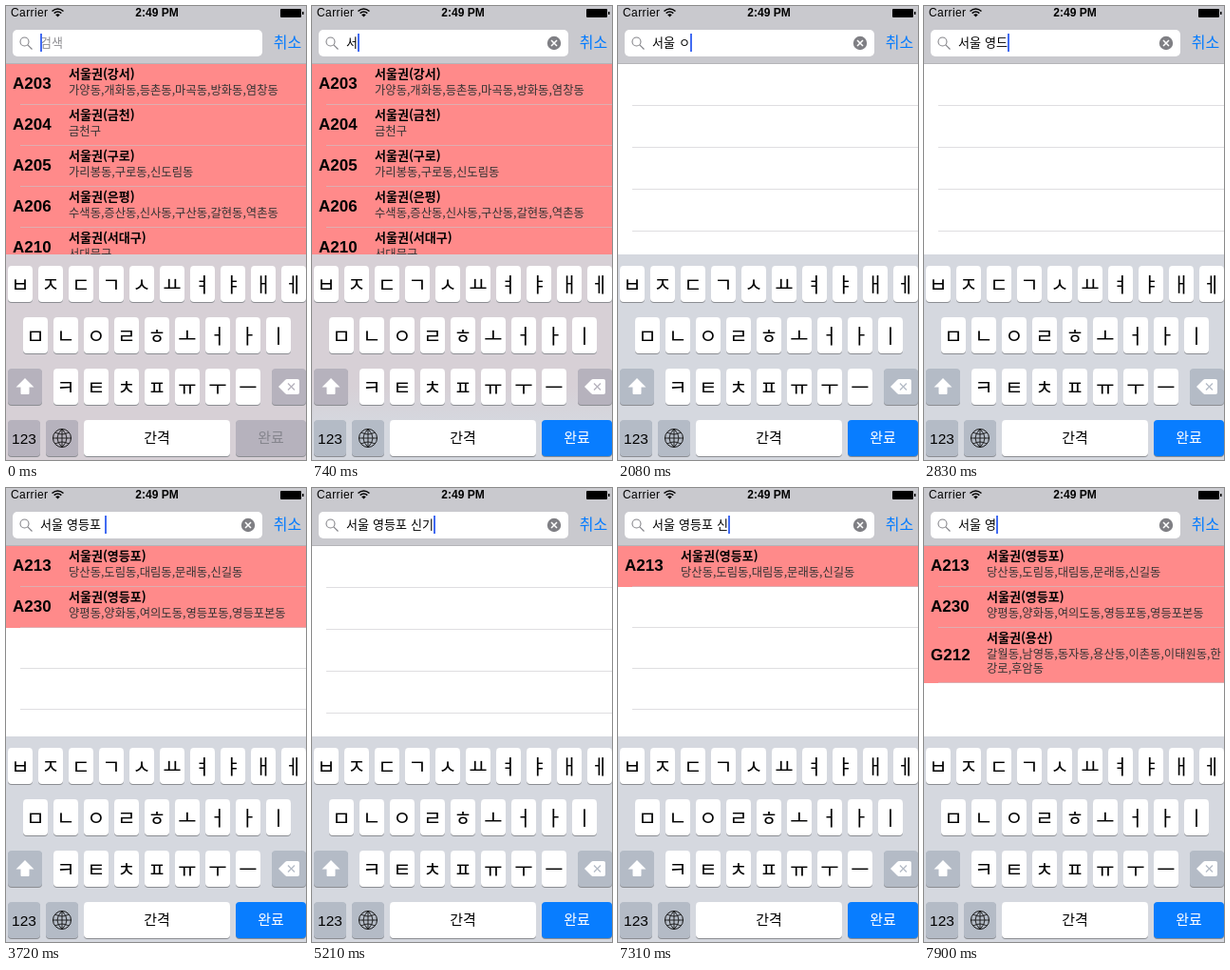
Write an HTML page with a canvas that moves like this. It is 316 px wide and 477 px high and loops after 8 s.

```html
<!DOCTYPE html>
<html lang="ko">
<head>
<meta charset="utf-8">
<style>
  html, body { margin: 0; width: 316px; height: 477px; overflow: hidden; }
  canvas { display: block; width: 316px; height: 477px; }
</style>
</head>
<body>
<canvas id="stage"></canvas>
<script>
const W = 316, H = 477, LOOP = 8000;
const KOREAN = '"Noto Sans CJK KR", "Noto Sans CJK", sans-serif';
const LATIN = '"Liberation Sans", sans-serif';
const canvas = document.getElementById('stage');
const ctx = canvas.getContext('2d');
const ratio = window.devicePixelRatio || 1;
canvas.width = W * ratio;
canvas.height = H * ratio;

const AREAS = [
  ['A203', '서울권(강서)', '가양동,개화동,등촌동,마곡동,방화동,염창동'],
  ['A204', '서울권(금천)', '금천구'],
  ['A205', '서울권(구로)', '가리봉동,구로동,신도림동'],
  ['A206', '서울권(은평)', '수색동,증산동,신사동,구산동,갈현동,역촌동'],
  ['A210', '서울권(서대구)', '서대문구'],
  ['A213', '서울권(영등포)', '당산동,도림동,대림동,문래동,신길동'],
  ['A230', '서울권(영등포)', '양평동,양화동,여의도동,영등포동,영등포본동'],
  ['G212', '서울권(용산)', '갈월동,남영동,동자동,용산동,이촌동,이태원동,한', '강로,후암동'],
];

// start time, typed text, caret opacity, query used for the list
const STEPS = [
  [0, ''], [450, 'ㅅ'], [600, '서'], [890, '성', 1, '서'],
  [1490, '서우'], [1640, '서울'], [1780, '서울 '],
  [2080, '서울 ㅇ'], [2230, '서울 여'], [2380, '서울 영'],
  [2830, '서울 영드'], [2980, '서울 영등'],
  [3420, '서울 영등ㅍ'], [3570, '서울 영등포'], [3720, '서울 영등포 '],
  [4470, '서울 영등포 ㅅ'], [4620, '서울 영등포 시'], [4770, '서울 영등포 신'], [4920, '서울 영등포 신ㄱ'],
  [5210, '서울 영등포 신기'], [5360, '서울 영등포 신길'],
  [5960, '서울 영등포 신길', .4], [6110, '서울 영등포 신길', 0],
  [6410, '서울 영등포 신길', .4], [6560, '서울 영등포 신길'],
  [6710, '서울 영등포 신기'], [7160, '서울 영등포 신ㄱ'], [7310, '서울 영등포 신'],
  [7460, '서울 영등포 '], [7600, '서울 영등포'], [7750, '서울 영등'], [7900, '서울 영'],
];

function rect(x, y, w, h, color, radius = 0) {
  ctx.fillStyle = color;
  ctx.beginPath();
  ctx.roundRect(x, y, w, h, radius);
  ctx.fill();
}

function text(str, x, y, font, color = '#000', align = 'left') {
  ctx.font = font;
  ctx.fillStyle = color;
  ctx.textAlign = align;
  ctx.fillText(str, x, y);
}

function path(d, color, lineWidth) {
  const shape = new Path2D(d);
  if (lineWidth) {
    ctx.strokeStyle = color;
    ctx.lineWidth = lineWidth;
    ctx.stroke(shape);
  } else {
    ctx.fillStyle = color;
    ctx.fill(shape);
  }
}

function circle(x, y, r, color, lineWidth) {
  path(`M${x - r} ${y}a${r} ${r} 0 1 1 ${2 * r} 0a${r} ${r} 0 1 1 ${-2 * r} 0z`, color, lineWidth);
}

function drawHeader(typed, caret) {
  rect(0, 0, W, 60, '#c9c9ce');
  rect(0, 60, W, 1, '#b4b4b8');
  ctx.letterSpacing = '0.4px';
  text('Carrier', 5, 11, '12px ' + LATIN);
  ctx.letterSpacing = '0px';
  path('M48.5 5.5Q54.5 0.5 60.5 5.5M50.7 7.6Q54.5 4.4 58.3 7.6', '#000', 1.6);
  path('M52.2 9.2Q54.5 7.4 56.8 9.2L54.5 11.6z', '#000');
  text('2:49 PM', 159, 11, 'bold 12px ' + LATIN, '#000', 'center');
  rect(289, 3, 22, 9, '#000', 1);
  rect(312, 6, 1.5, 3, '#000');

  rect(7, 25, 263, 28, '#fff', 5);
  circle(19.5, 37.5, 4.5, '#85858a', 1.1);
  path('M22.8 40.8L27.5 45.5', '#85858a', 1.2);
  ctx.wordSpacing = '1.1px';
  text(typed || '검색', 36, 43, '13.04px ' + KOREAN, typed ? '#000' : '#8e8e93');
  const caretX = Math.round(36 + ctx.measureText(typed).width);
  ctx.wordSpacing = '0px';
  ctx.globalAlpha = caret;
  rect(caretX, 29, 2, 19, '#426bf2');
  ctx.globalAlpha = 1;
  if (typed) {
    circle(255, 39, 7.2, '#7f7f84');
    path('M252 36l6 6M258 36l-6 6', '#fff', 1.5);
  }
  text('취소', 296.5, 43.5, '16px ' + KOREAN, '#007aff', 'center');
}

function drawList(rows) {
  rect(0, 61, W, 200, '#fff');
  ctx.save();
  ctx.beginPath();
  ctx.rect(0, 61, W, 200);
  ctx.clip();
  let y = 61, height = 44;
  for (let i = 0; y < 261; i++, y += height) {
    const row = rows[i];
    if (row) {
      const [code, title, ...lines] = row;
      height = 28 + 15 * lines.length;
      rect(0, y, W, height, '#ff8a8a');
      text(code, 7, y + height / 2 + 4.5, 'bold 17px ' + LATIN);
      text(title, 66, y + 15, 'bold 13px ' + KOREAN);
      lines.forEach((line, n) => text(line, 66, y + 32 + 15 * n, '300 12.3px ' + KOREAN, '#333'));
    }
    rect(15, y + height - 1, W - 15, 1, 'rgba(200,199,204,.58)');
  }
  ctx.restore();
}

function key(x, y, w, color = '#fff', label = '', font = '300 21px ' + KOREAN, drop = 8, ink = '#000') {
  rect(x, y + 1, w, 38, '#8b8d92', 4);
  rect(x, y, w, 38, color, 4);
  text(label, x + w / 2, y + 19 + drop, font, ink, 'center');
}

function drawKeyboard(active, tinted) {
  rect(0, 261, W, 216, '#d5d8df');
  if (tinted) {
    const tint = ctx.createLinearGradient(0, 400, 0, 440);
    tint.addColorStop(0, '#d7d0d6');
    tint.addColorStop(1, active ? '#d5d8df' : '#d7d0d6');
    rect(0, 261, W, 216, tint);
  }
  const gray = tinted ? '#b6b2bd' : '#b4bbc6';
  ['ㅂㅈㄷㄱㅅㅛㅕㅑㅐㅔ', 'ㅁㄴㅇㄹㅎㅗㅓㅏㅣ', 'ㅋㅌㅊㅍㅠㅜㅡ'].forEach((row, r) =>
    [...row].forEach((jamo, i) => key([2, 18, 50][r] + 32 * i, 273 + 54 * r, 26, '#fff', jamo)));

  key(2, 381, 36, gray);
  path('M20 391l9.5 9.5h-5v6.5q0 1-1 1h-7q-1 0-1-1v-6.5h-5z', '#fff');
  key(280, 381, 36, gray);
  path('M287 400l7-7q1-1 2-1h11q2 0 2 2v12q0 2-2 2h-11q-1 0-2-1z', '#fff');
  path('M297 396.5l7 7M304 396.5l-7 7', gray, 1.3);

  const small = '15px ' + KOREAN;
  const bottomGray = active ? '#b4bbc6' : gray;
  key(2, 435, 34, bottomGray, '123', '15.5px ' + LATIN, 6);
  key(42, 435, 34, bottomGray);
  circle(59, 454, 9.5, '#111', 1);
  path('M59 444.5v19M49.5 454h19M59 444.5q-10 9.5 0 19M59 444.5q10 9.5 0 19M52 448q7 4 14 0M52 460q7-4 14 0', '#111', .9);
  key(82, 435, 154, '#fff', '간격', small, 4.5);
  key(242, 435, 74, active ? '#087dff' : bottomGray, '완료', small, 4.5, active ? '#fff' : '#85858d');
}

function draw(now) {
  const t = now % LOOP;
  const [, typed, caret = 1, query = typed] = STEPS.findLast(step => step[0] <= t);
  const words = query.split(' ');
  const rows = AREAS.filter(area => words.every(word => area.join(' ').includes(word)));
  ctx.setTransform(ratio, 0, 0, ratio, 0, 0);
  drawHeader(typed, caret);
  drawList(rows);
  drawKeyboard(typed !== '', rows.length > 5);
}

const start = performance.now();
function tick() {
  draw(performance.now() - start);
  requestAnimationFrame(tick);
}
tick();
</script>
</body>
</html>
```
